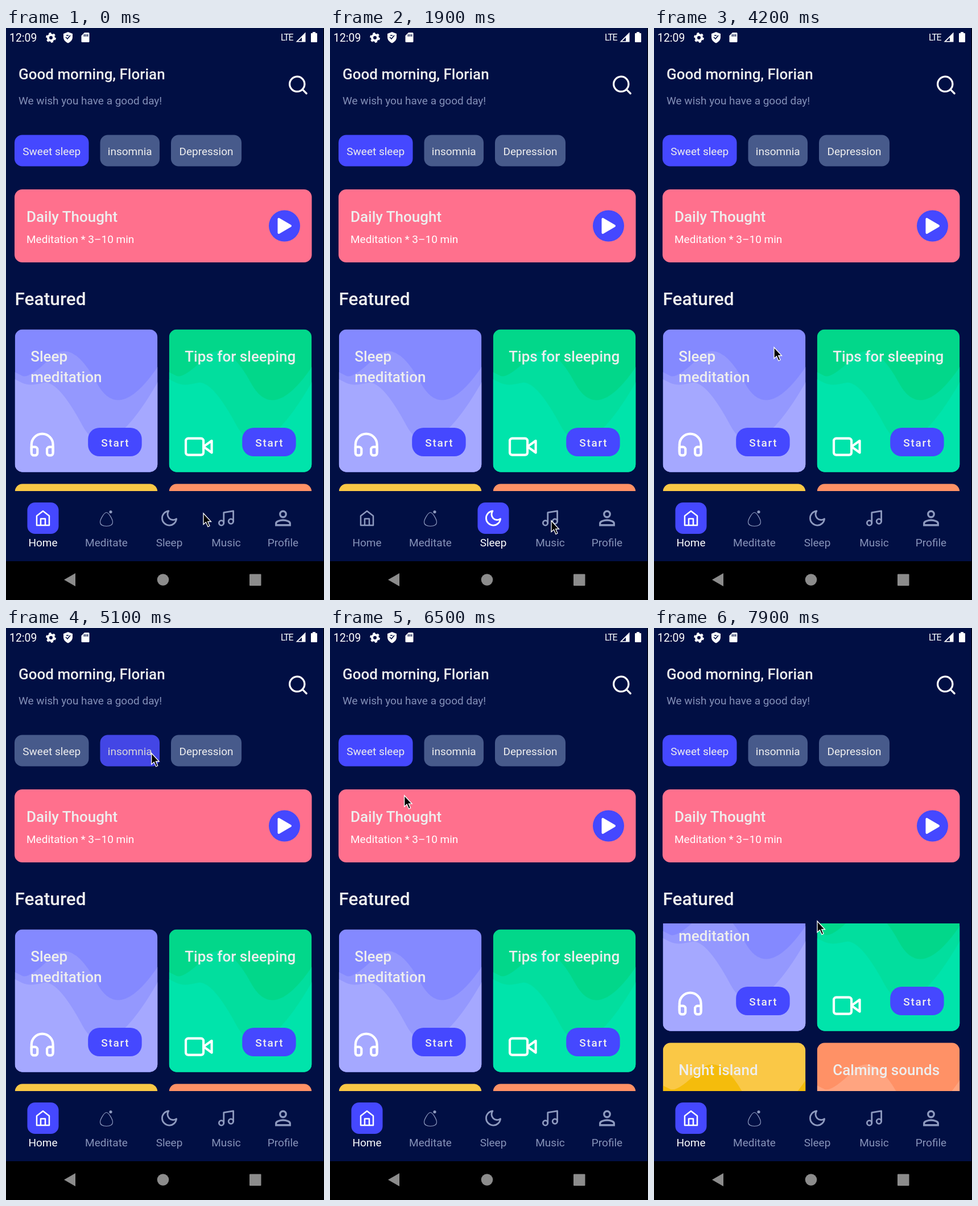
An HTML page for the animation above (8 s loop, 559x1003 px).

```html
<!DOCTYPE html>
<html lang="en">
<head>
<meta charset="utf-8">
<title>Meditation app</title>
<style>
  html, body { margin: 0; width: 100%; height: 100%; overflow: hidden; background: #010f44; }
  svg { display: block; width: 100%; height: 100%; font-family: Roboto, sans-serif; }
  .title { font-size: 26px; font-weight: 500; fill: #eee; }
  .light { font-size: 19px; font-weight: 400; fill: #eee; }
  .mid { text-anchor: middle; }
  .line { fill: none; stroke: currentColor; stroke-linecap: round; stroke-linejoin: round; }
  .start { font-size: 19px; font-weight: 500; letter-spacing: 1.7px; fill: #eee; }
  .chip rect { fill: #475a8b; }
  .chip.on rect { fill: #4548ff; }
  .tab { color: #8e9abf; }
  .tab text { fill: #8793b9; }
  .tab rect { fill: none; }
  .tab.on { color: #fff; }
  .tab.on text { fill: #fff; }
  .tab.on rect { fill: #4548ff; }
</style>
</head>
<body>
<svg viewBox="0 0 559 1003">
  <defs>
    <clipPath id="list"><rect y="518" width="559" height="294"/></clipPath>
    <clipPath id="cardShape"><rect width="250.500" height="250" rx="13.6"/></clipPath>
    <clipPath id="pressShape"><rect id="pressBox"/></clipPath>
    <g id="headphones" class="line" stroke-width="2">
      <path d="M3 18v-6a9 9 0 0 1 18 0v6"/>
      <path d="M21 19a2 2 0 0 1-2 2h-1a2 2 0 0 1-2-2v-3a2 2 0 0 1 2-2h3zM3 19a2 2 0 0 0 2 2h1a2 2 0 0 0 2-2v-3a2 2 0 0 0-2-2H3z"/>
    </g>
    <g id="video" class="line" stroke-width="2">
      <path d="M23 7l-7 5 7 5z"/><rect x="1" y="5" width="15" height="14" rx="2"/>
    </g>
  </defs>
  <rect width="559" height="1003" fill="#010f44"/>

  <!-- status bar -->
  <g fill="#fff">
    <text x="6" y="24" font-size="19.4">12:09</text>
    <circle cx="79" cy="17" r="5" fill="none" stroke="#fff" stroke-width="4"/>
    <circle cx="79" cy="17" r="7.6" fill="none" stroke="#fff" stroke-width="2.6" stroke-dasharray="4 3.96"/>
    <path d="M109 7l8 3v6c0 5-3.500 8.500-8 10.500c-4.500-2-8-5.500-8-10.500v-6z"/>
    <path d="M105 16l3 3 5-6M106 13h4" fill="none" stroke="#010f44" stroke-width="1.6"/>
    <path d="M138 8h7q1.500 0 1.500 1.500v14q0 1.500-1.500 1.500h-11q-1.500 0-1.500-1.500v-10z"/>
    <path d="M137.500 11v4M140.500 11v4M143.500 11v4" stroke="#010f44" stroke-width="1.500"/>
    <text x="483" y="22" font-size="16" letter-spacing="-1.2">LTE</text>
    <path d="M526.500 7.500v17h-17z"/>
    <path d="M520 16.500v6.500h-6.500z" fill="#010f44"/>
    <path d="M539 7h5v2h2q1 0 1 1v14q0 1-1 1h-9q-1 0-1-1v-14q0-1 1-1h2z"/>
  </g>

  <!-- greeting -->
  <text class="title" x="22" y="90">Good morning, Florian</text>
  <text class="light" x="22" y="133.500" style="fill:#8490b8">We wish you have a good day!</text>
  <g class="line" color="#fff" stroke-width="2" transform="translate(493.700 80.300) scale(1.64)">
    <circle cx="11" cy="11" r="8"/><path d="M21 21l-4.350-4.350"/>
  </g>

  <g id="chips"></g>

  <!-- daily thought -->
  <rect x="15" y="283" width="522.500" height="128" rx="13.6" fill="#ff708d"/>
  <text class="title" x="36" y="339.500">Daily Thought</text>
  <text class="light" x="36" y="377" style="fill:#fff">Meditation * 3–10 min</text>
  <circle cx="489.500" cy="347" r="27.500" fill="#4548ff"/>
  <path d="M479.500 335v24l20.500-12z" fill="#fff" stroke="#fff" stroke-width="4" stroke-linejoin="round"/>

  <text class="title" x="15.500" y="486" style="font-size:31.700px">Featured</text>
  <g clip-path="url(#list)"><g id="cards"></g></g>

  <g id="tabs"></g>

  <!-- system navigation -->
  <rect y="935" width="559" height="68"/>
  <g fill="#8c8c8c">
    <path d="M102 967.500l20-11.500v23z"/><circle cx="276" cy="967.500" r="10.300"/>
    <rect x="428" y="957.500" width="20.500" height="20.500" rx="1"/>
  </g>
  <rect x="558" width="1" height="1003"/>

  <g clip-path="url(#pressShape)"><circle id="ripple" fill="#3c3c3c"/></g>
  <path id="cursor" d="M0 0V19.500L4.500 15.500 8 23.500 11 22 7.700 14.500H13.500Z" fill="#000" stroke="#fff" stroke-width="1.300"/>
</svg>

<script>
const $ = id => document.getElementById(id);

const chips = [
  { name: 'Sweet sleep', x: 15, w: 130.5 },
  { name: 'insomnia', x: 165.5, w: 104.5 },
  { name: 'Depression', x: 290, w: 124 }
];
$('chips').innerHTML = chips.map(({ name, x, w }) => `<g class="chip">
  <rect x="${x}" y="187.5" width="${w}" height="55" rx="13.6"/>
  <text class="light mid" x="${x + w / 2}" y="222.5">${name}</text></g>`).join('');

const WAVE_MID = 'M0 75L12.5 81.25Q25 87.5 62.5 50Q100 12.5 143.75 93.75Q187.5 175 268.75 37.5V260H0Z';
const WAVE_LOW = 'M0 87.5L12.5 93.75Q25 100 50 93.75Q75 87.5 118.75 168.75Q162.5 250 256.25 83.3V260H0Z';
const cards = [
  { lines: ['Sleep', 'meditation'], icon: 'headphones', colors: ['#8489ff', '#9498fe', '#a5a8ff'] },
  { lines: ['Tips for sleeping'], icon: 'video', colors: ['#02d78a', '#02de9e', '#00e4ab'] },
  { lines: ['Night island'], icon: 'headphones', colors: ['#fac846', '#f5bc0c', '#f0b000'] },
  { lines: ['Calming sounds'], icon: 'headphones', colors: ['#ff9166', '#ffa480', '#ffb698'] }
];
const icons = {
  headphones: 'translate(22.8 176.8) scale(2.1)',
  video: 'translate(27.3 180.8) scale(2.07)'
};
$('cards').innerHTML = cards.map(({ lines, icon, colors: [top, mid, low] }, i) => `
  <g transform="translate(${15.7 + i % 2 * 271} ${528.5 + (i >> 1) * 270.7})">
    <g clip-path="url(#cardShape)">
      <rect width="251" height="251" fill="${top}"/>
      <path d="${WAVE_MID}" fill="${mid}"/><path d="${WAVE_LOW}" fill="${low}"/>
    </g>
    ${lines.map((line, n) => `<text class="title" x="27.5" y="${56.5 + n * 36}">${line}</text>`).join('')}
    <use href="#${icon}" color="#fff" transform="${icons[icon]}"/>
    <rect x="128.500" y="172.500" width="94.500" height="50" rx="20" fill="#4548ff"/>
    <text class="start" x="151.500" y="205.500">Start</text>
  </g>`).join('');

// Tab icons are drawn around their own centre.
const tabs = [
  { name: 'Home', x: 65, icon: '<path stroke-width="2.5" d="M-11-4L0-12.500 11-4V12.500H-11ZM-4 12.500V1H4V12.500"/>' },
  { name: 'Meditate', x: 176.5, icon: `<path stroke-width="1.2" d="M0-10C4-10 11 2 11 7S6 14 0 14-11 12-11 7-4-10 0-10Z"/>
    <circle cx="7.500" cy="-11" r="2.600" fill="currentColor" stroke="none"/>` },
  { name: 'Sleep', x: 287, icon: `<path stroke-width="2" transform="scale(1.4) translate(-12 -12)"
    d="M21 12.79A9 9 0 1 1 11.21 3 7 7 0 0 0 21 12.79z"/>` },
  { name: 'Music', x: 387, icon: `<g stroke-width="2" transform="scale(1.4) translate(-12 -12)">
    <path d="M9 18V5l12-2v13"/><circle cx="6" cy="18" r="3"/><circle cx="18" cy="16" r="3"/></g>` },
  { name: 'Profile', x: 487, icon: `<g stroke-width="1.9" stroke-linejoin="miter" transform="scale(1.75) translate(-12 -12)">
    <circle cx="12" cy="8" r="3"/><path d="M5 19v-2c0-1.600 4-3 7-3s7 1.400 7 3v2z"/></g>` }
];
$('tabs').innerHTML = tabs.map(({ name, x, icon }) => `<g class="tab">
  <rect x="${x - 27.5}" y="832" width="55" height="55" rx="13.6"/>
  <g class="line" transform="translate(${x} 859.5)">${icon}</g>
  <text class="light mid" x="${x}" y="908.5">${name}</text></g>`).join('');

const LOOP = 8000, STEP = 100;
// Cursor stops: time, x, y
const path = [
  [0, 347, 851], [600, 181, 862], [900, 181, 862], [1300, 287, 865], [1500, 287, 865],
  [1900, 389, 864], [2200, 389, 864], [2700, 91, 857], [3100, 91, 857],
  [4200, 211, 560], [4800, 222, 220], [5000, 222, 220], [5300, 352, 218], [5500, 352, 218],
  [5900, 137, 212], [6300, 120, 214], [7100, 188, 724], [7300, 188, 724],
  [7600, 285, 604], [7900, 287, 514]
];
const tabBox = i => [tabs[i].x - 27.5, 832, 55, 55, 13.6];
const chipBox = i => [chips[i].x, 187.5, chips[i].w, 55, 13.6];
const clicks = [
  { at: 700, tab: 1 }, { at: 1300, tab: 2 }, { at: 2000, tab: 3 }, { at: 2800, tab: 0 },
  { at: 4800, chip: 1 }, { at: 5300, chip: 2 }, { at: 6000, chip: 0 },
  { at: 7200, box: [144.3, 701, 94.5, 50, 20] }
];
clicks.forEach(c => c.box ??= c.tab !== undefined ? tabBox(c.tab) : chipBox(c.chip));

const clamp = v => Math.min(1, Math.max(0, v));
const smooth = v => v * v * (3 - 2 * v);

function cursorAt(t) {
  const i = path.findIndex(p => p[0] > t);
  if (i < 0) return path.at(-1).slice(1);
  const [a, b] = [path[i - 1], path[i]];
  const k = smooth((t - a[0]) / (b[0] - a[0]));
  return [1, 2].map(n => a[n] + (b[n] - a[n]) * k);
}

function select(kind, t) {
  const last = clicks.findLast(c => c.at <= t && c[kind] !== undefined);
  document.querySelectorAll('.' + kind).forEach((el, i) =>
    el.classList.toggle('on', i === (last ? last[kind] : 0)));
}

function setAttrs(el, attrs) {
  for (const name in attrs) el.setAttribute(name, attrs[name]);
}

function drawRipple(t) {
  const click = clicks.findLast(c => c.at <= t && t < c.at + 400);
  if (!click) return setAttrs($('ripple'), { opacity: 0 });
  const age = t - click.at;
  const [x, y, width, height, rx] = click.box;
  const [cx, cy] = cursorAt(click.at);
  setAttrs($('pressBox'), { x, y, width, height, rx });
  setAttrs($('ripple'), { cx, cy, r: 15 + age * 0.2, opacity: 0.26 * clamp((400 - age) / 200) });
}

function draw(t) {
  select('tab', t);
  select('chip', t);
  drawRipple(t);
  const scroll = 72 * smooth(clamp((t - 7600) / 300));
  $('cards').setAttribute('transform', `translate(0 ${-scroll})`);
  $('cursor').setAttribute('transform', `translate(${cursorAt(t)})`);
}

const began = performance.now();
function tick() {
  const t = (performance.now() - began) % LOOP;
  draw(Math.floor(t / STEP) * STEP);
  requestAnimationFrame(tick);
}
tick();
</script>
</body>
</html>
```
